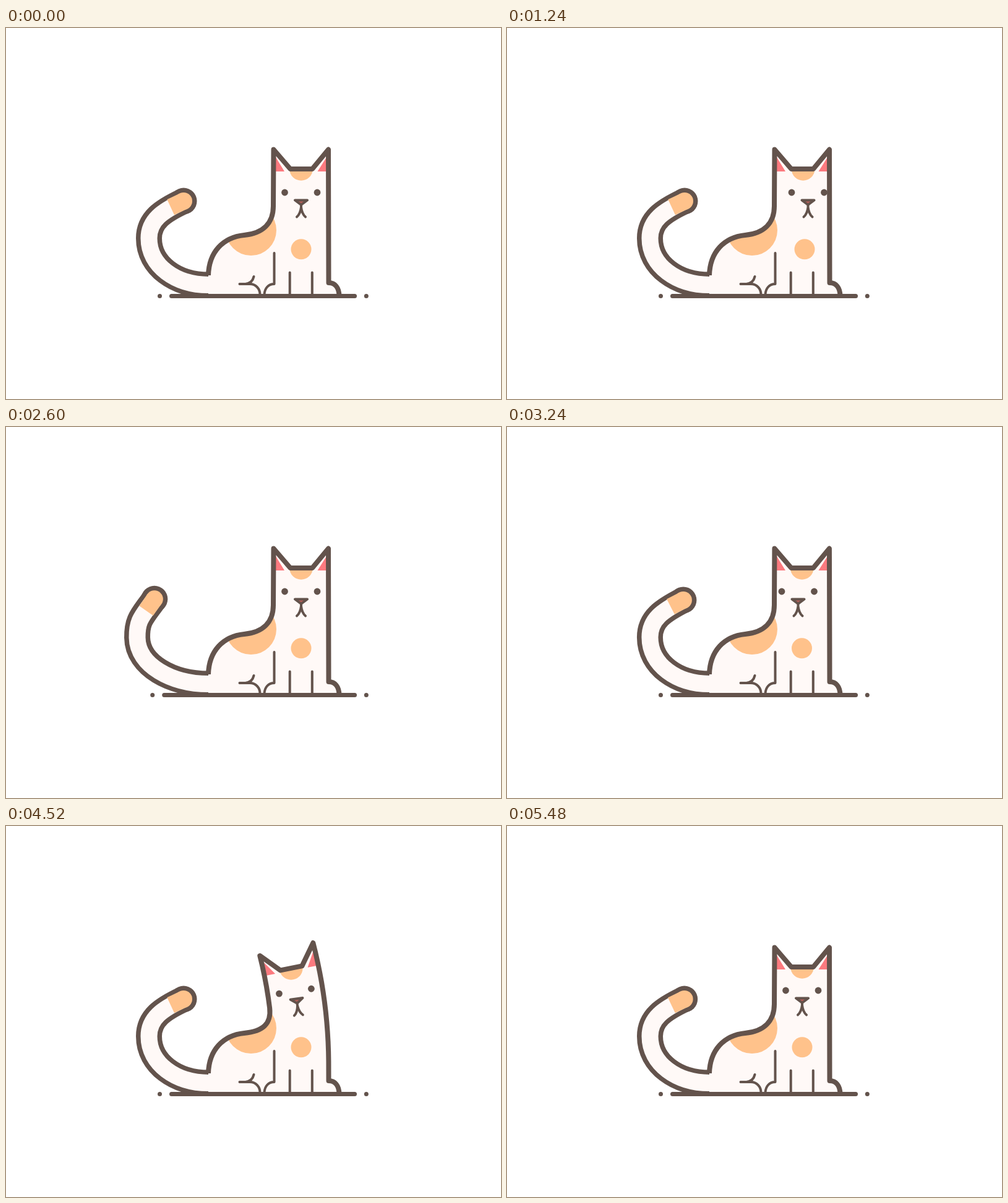
Write an HTML page with a canvas that moves like this. It is 800x600 px and loops after 5.52 s.

```html
<!DOCTYPE html>
<html lang="en">
<head>
<meta charset="utf-8">
<title>Sitting cat</title>
<style>
html, body { margin: 0; width: 100%; height: 100%; overflow: hidden; background: #fff; }
canvas { display: block; }
</style>
</head>
<body>
<canvas id="stage" width="800" height="600"></canvas>
<script>
const ctx = document.getElementById('stage').getContext('2d');
const LOOP = 5520, SWING = LOOP / 5, STEP = 40;
const INK = '#63534c', FUR = '#fff9f7', SPOT = '#ffc28b', PINK = '#fb7a7f';

const ease = u => u < .5 ? 4 * u ** 3 : 1 - 4 * (1 - u) ** 3;
const ramp = (t, from, to) => ease(Math.min(1, Math.max(0, (t - from) / (to - from))));
const pulse = (t, a, b, c, d) => ramp(t, a, b) - ramp(t, c, d);

function stroke(width, color = INK, cap = 'round') {
  ctx.lineWidth = width;
  ctx.strokeStyle = color;
  ctx.lineCap = cap;
  ctx.lineJoin = 'round';
  ctx.stroke();
}

function disc(x, y, r, color) {
  ctx.beginPath();
  ctx.arc(x, y, r, 0, 7);
  ctx.fillStyle = color;
  ctx.fill();
}

// swing moves the root, flick (a little later) turns the tip: 0 curled, 1 upright
function drawTail(swing, flick) {
  const late = flick ** 3;
  const jx = 231 - 17 * swing - 40 * swing * (1 - swing), jy = 340 + 10 * late;
  const tx = jx + 56 - 72 * flick, ty = jy - 60 - 15 * flick ** 2;
  const angle = (25 + 76 * flick) * Math.PI / 180;
  const back = len => [tx - len * Math.cos(angle), ty + len * Math.sin(angle)];

  const trace = () => {
    ctx.beginPath();
    ctx.moveTo(336, 415.5);
    ctx.lineTo(327, 415.5);
    ctx.bezierCurveTo(275 - 13 * swing, 415.5, jx + 10 * late, jy + 45, jx, jy);
    ctx.bezierCurveTo(jx - 6 * late, jy - 29, ...back(38 - 8 * flick), tx, ty);
  };
  disc(tx, ty, 21.5, INK);
  trace();
  stroke(42, INK, 'butt');
  trace();
  stroke(27, FUR, 'butt');
  ctx.beginPath();
  ctx.moveTo(tx, ty);
  ctx.lineTo(...back(23));
  stroke(27.5, SPOT, 'butt');
  disc(tx, ty, 14, SPOT);
}

// Leans a point of the head and neck to the left, more with height
function leaner(tilt) {
  return (x, y) => {
    const h = Math.max(0, 385 - y), r = .00126 * h * tilt, off = x - 477;
    return [
      477 - .00066 * h * h * tilt + off * Math.cos(r),
      y + .00008 * h * h * tilt - off * Math.sin(r)
    ];
  };
}

function lineVia(lean, x0, y0, x1, y1, n) {
  for (let i = 1; i <= n; i++) {
    ctx.lineTo(...lean(x0 + (x1 - x0) * i / n, y0 + (y1 - y0) * i / n));
  }
}

function outline(lean) {
  ctx.lineTo(327, 400);
  ctx.bezierCurveTo(328, 362, 351, 338.5, 385, 335);
  ctx.bezierCurveTo(415, 332, ...lean(432, 316), ...lean(432, 288));
  lineVia(lean, 432, 288, 432.5, 196.5, 5);
  ctx.lineTo(...lean(459.5, 228));
  ctx.lineTo(...lean(495, 228));
  ctx.lineTo(...lean(521, 196.5));
  lineVia(lean, 521, 196.5, 521.5, 412, 14);
  ctx.bezierCurveTo(532, 412, 538, 420, 538.5, 433);
}

function triangle(lean, ...p) {
  ctx.beginPath();
  for (let i = 0; i < 6; i += 2) ctx.lineTo(...lean(p[i], p[i + 1]));
  ctx.closePath();
}

function drawBody(lean, shift) {
  ctx.save();
  ctx.beginPath();
  ctx.moveTo(327, 433);
  outline(lean);
  ctx.closePath();
  ctx.fillStyle = FUR;
  ctx.fill();
  ctx.clip();
  disc(396, 327, 41, SPOT);
  disc(...lean(477 + shift * .4, 228), 18.8, SPOT);
  disc(477 + shift, 357.8, 16.5, SPOT);
  ctx.fillStyle = PINK;
  triangle(lean, 436, 209, 436, 232, 450, 232);
  ctx.fill();
  triangle(lean, 518, 209, 518, 232, 503.5, 232);
  ctx.fill();
  ctx.restore();
  ctx.beginPath();
  outline(lean);
  stroke(8, INK, 'butt');
}

function drawLegs() {
  ctx.beginPath();
  ctx.moveTo(433.5, 364);
  ctx.lineTo(433.5, 414);
  ctx.bezierCurveTo(424, 414, 418, 421, 417.5, 431);
  for (const x of [458.7, 494.8]) {
    ctx.moveTo(x, 395.5);
    ctx.lineTo(x, 431);
  }
  ctx.moveTo(377.5, 414);
  ctx.lineTo(394, 414);
  ctx.bezierCurveTo(404, 414, 410.5, 422, 410.5, 431);
  ctx.moveTo(400.5, 402);
  ctx.bezierCurveTo(399, 409, 394, 413, 387, 414);
  stroke(4);
}

function drawFace(lean, shift) {
  const on = (x, y) => lean(x + shift, y);
  disc(...on(450.5, 266), 5.4, INK);
  disc(...on(503, 266), 5.4, INK);
  triangle(on, 467, 278.5, 487, 278.5, 477, 286);
  ctx.fillStyle = '#b5605a';
  ctx.fill();
  stroke(4);
  ctx.beginPath();
  for (const side of [-1, 1]) {
    ctx.moveTo(...on(477, 286));
    ctx.lineTo(...on(477, 290));
    ctx.quadraticCurveTo(...on(477 + side * 1.5, 301), ...on(477 + side * 7, 305.5));
  }
  stroke(4);
}

function drawGround(x) {
  ctx.beginPath();
  ctx.moveTo(x + 19, 433.5);
  ctx.lineTo(563.5, 433.5);
  stroke(7);
  disc(x, 433.5, 3.5, INK);
  disc(582.3, 433.5, 3.5, INK);
}

function draw(t) {
  const phase = t % SWING / SWING;
  const swing = pulse(phase, .1, .6, .64, .955);
  const flick = pulse(phase, .12, .63, .66, 1);
  const lean = leaner(pulse(t, 3200, 3640, 4840, 5240));
  const look = 9.5 * pulse(t, 560, 760, 1960, 2160) - 6.5 * pulse(t, 3000, 3200, 4100, 4300);
  const chest = 4 * pulse(t, 640, 1160, 1980, 2240) - 3.3 * pulse(t, 3080, 3560, 4120, 4420);
  ctx.fillStyle = '#fff';
  ctx.fillRect(0, 0, 800, 600);
  drawTail(swing, flick);
  drawBody(lean, chest);
  drawLegs();
  drawFace(lean, look);
  drawGround(248.5 - 22.2 * swing);
}

const start = performance.now();
function tick() {
  const t = (performance.now() - start) % LOOP;
  draw(Math.floor(t / STEP) * STEP);
  requestAnimationFrame(tick);
}
tick();
</script>
</body>
</html>
```
